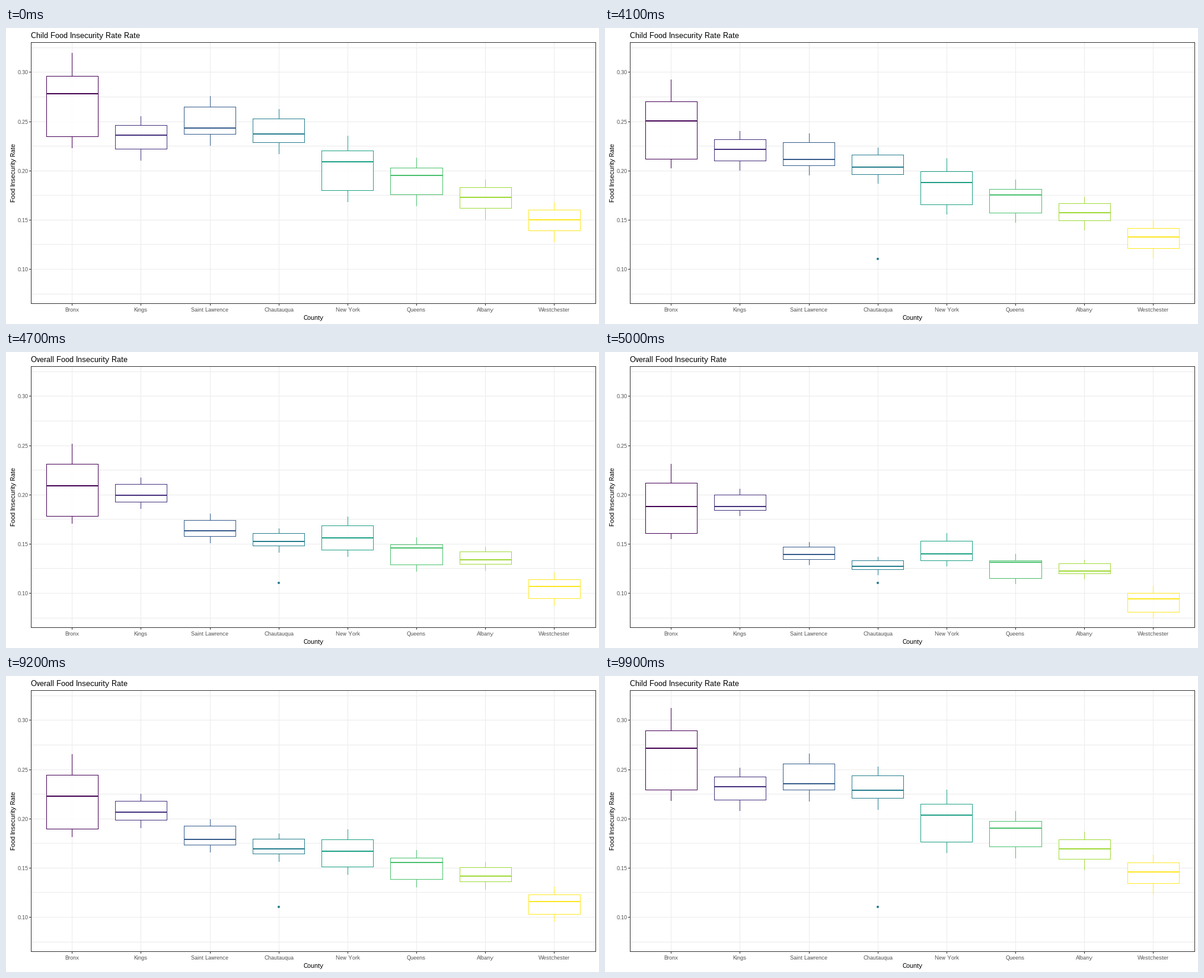
Recreate the animation shown at these times as a matplotlib script. Size 1000 by 500 pixels, loop 10 s.

```python
import matplotlib.pyplot as plt
import numpy as np
from matplotlib.animation import FuncAnimation
from matplotlib.patches import Circle, Rectangle

plt.rcParams.update({
    "font.family": "Liberation Sans",
    "text.hinting": "native",
    "text.hinting_factor": 1,
    "text.kerning_factor": 6,
    "toolbar": "None",
})

W, H, DPI = 1000, 500, 100
FRAMES, INTERVAL = 100, 100
STEPS = 13                      # frames per transition
LEAVE, RETURN = 37, 87          # last still frame before each transition
LEFT, RIGHT, TOP, BOTTOM = 42, 994, 24, 465
GRID, DARK, TICK_TEXT = "#EBEBEB", "#333333", "#4D4D4D"
CHILD, OVERALL = "Child Food Insecurity Rate Rate", "Overall Food Insecurity Rate"

# county: (upper quartile, median, lower quartile) of child and overall rates
COUNTIES = {
    "Bronx": ((.296, .278, .2348), (.212, .188, .161)),
    "Kings": ((.246, .236, .2218), (.200, .188, .1839)),
    "Saint Lawrence": ((.265, .243, .237), (.147, .139, .134)),
    "Chautauqua": ((.253, .237, .2287), (.133, .127, .124)),
    "New York": ((.220, .209, .180), (.153, .140, .133)),
    "Queens": ((.203, .195, .176), (.133, .131, .115)),
    "Albany": ((.183, .173, .162), (.130, .122, .120)),
    "Westchester": ((.160, .150, .139), (.100, .094, .081)),
}
PALETTE = plt.get_cmap("viridis")(np.linspace(0, 1, len(COUNTIES)))

fig = plt.figure(figsize=(W / DPI, H / DPI), dpi=DPI, facecolor="white")
ax = fig.add_axes([0, 0, 1, 1])
ax.set_xlim(0, W)
ax.set_ylim(H, 0)
ax.axis("off")


def row(rate):
    return round(74.385 + (0.3 - rate) * 1663.3)


def center(i):
    return 111.36 + 116.13 * i


def whisker_ends(q3, q1, p):
    """The upper whisker follows the box height, the lower one the rate type."""
    return q3 + 0.38 * (q3 - q1), q1 - 0.012 + 0.006 * p


def rect(x, y, w, h, color, z=1, alpha=1):
    patch = Rectangle((x, y), w, h, facecolor=color, edgecolor="none",
                      linewidth=0, antialiased=False, alpha=alpha, zorder=z)
    return ax.add_patch(patch)


def label(x, y, text, px, color="black", **kw):
    return ax.text(x, y, text, fontsize=px * 72 / DPI, color=color,
                   va="baseline", zorder=6, **kw)


class Box:
    def __init__(self, i, color, child, overall):
        self.child, self.overall = np.array(child), np.array(overall)
        mid, half = center(i), 43.53
        x0, x1 = round(mid - half), round(mid + half)
        w = x1 - x0 + 1
        self.fill = rect(x0, 0, w, 1, "white", 3, 0.9)
        self.sides = [rect(x, 0, 1, 1, color, 4) for x in (x0, x1)]
        self.edges = [rect(x0, 0, w, 1, color, 4) for _ in range(2)]
        self.median = rect(x0, 0, w, 2, color, 4)
        self.whiskers = [rect(round(mid), 0, 1, 1, color, 4) for _ in range(2)]

    def update(self, p):
        rates = self.child + (self.overall - self.child) * p
        q3, med, q1 = map(row, rates)
        high, low = map(row, whisker_ends(rates[0], rates[2], p))
        for part in [self.fill, *self.sides]:
            part.set_y(q3)
            part.set_height(q1 - q3 + 1)
        for edge, y in zip(self.edges, (q3, q1)):
            edge.set_y(y)
        self.median.set_y(med - 1)
        for whisker, y0, y1 in zip(self.whiskers, (high, q1), (q3, low)):
            whisker.set_y(y0)
            whisker.set_height(y1 - y0)


# grid, ticks and tick labels
for k in range(11):
    rate = 0.075 + 0.025 * k
    y = row(rate)
    rect(LEFT, y, RIGHT - LEFT, 1, GRID)
    if k % 2:
        rect(LEFT - 3, y, 3, 1, DARK)
        label(37.5, y + 4, f"{rate:.2f}", 9, TICK_TEXT, ha="right")

boxes = []
for i, (name, quartiles) in enumerate(COUNTIES.items()):
    x = round(center(i))
    rect(x, TOP, 1, BOTTOM - TOP, GRID)
    rect(x, BOTTOM + 1, 1, 3, DARK)
    label(x, 479, name, 9, TICK_TEXT, ha="center")
    boxes.append(Box(i, PALETTE[i], *quartiles))

# panel border
for y in (TOP, BOTTOM):
    rect(LEFT, y, RIGHT - LEFT + 1, 1, DARK, 5)
for x in (LEFT, RIGHT):
    rect(x, TOP, 1, BOTTOM - TOP + 1, DARK, 5)

title = label(LEFT, 17, CHILD, 13, ha="left")
label(518, 493, "County", 11, ha="center")
label(16, 245, "Food Insecurity Rate", 11, ha="center",
      rotation=90, rotation_mode="anchor")

outlier_color = PALETTE[list(COUNTIES).index("Chautauqua")]
outlier = ax.add_patch(Circle((460, 390), 2, facecolor=outlier_color,
                              edgecolor="none", linewidth=0, zorder=5))


def progress(frame):
    """0 shows the child rates, 1 the overall rates."""
    leave, back = np.clip((frame - np.array([LEAVE, RETURN])) / STEPS, 0, 1)
    return leave - back


def update(frame):
    p = progress(frame)
    for box in boxes:
        box.update(p)
    switch = STEPS // 2 + 2
    title.set_text(OVERALL if LEAVE + switch <= frame < RETURN + switch else CHILD)
    outlier.set_visible(frame > LEAVE)
    return []


anim = FuncAnimation(fig, update, frames=FRAMES, interval=INTERVAL,
                     repeat=True, repeat_delay=0, blit=False)
plt.show()
```
